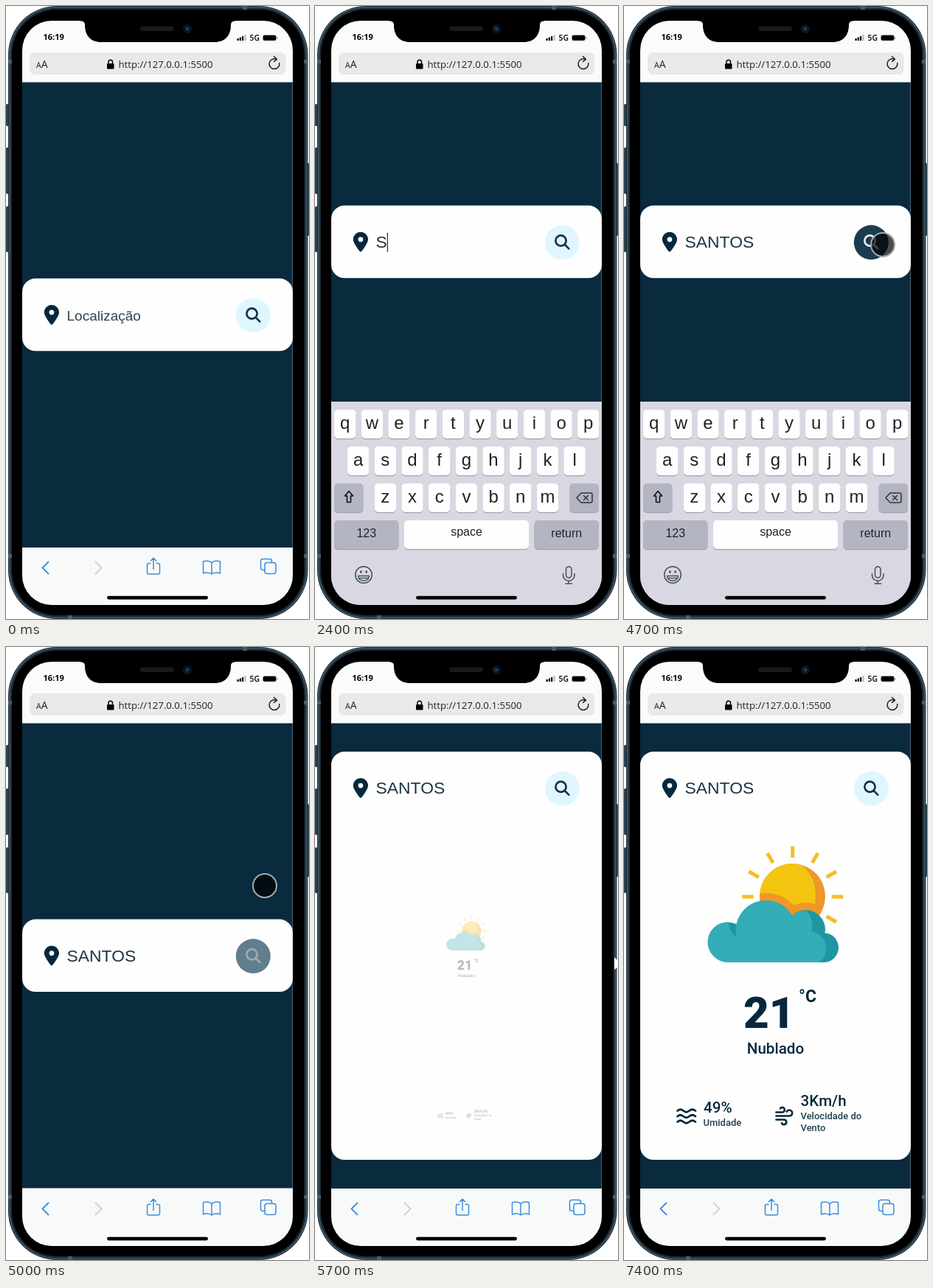
An HTML page that plays this animation: 411x832 px, repeating every 9.3 s.

```html
<!DOCTYPE html>
<html lang="pt-BR">
<head>
<meta charset="utf-8">
<title>Previsão do tempo</title>
<style>
html, body { margin: 0; width: 100%; height: 100%; overflow: hidden; background: #fff; }
svg { display: block; width: 100%; height: 100%; }
.ui { font-family: "Open Sans", "Noto Sans", sans-serif; }
.arial { font-family: "Liberation Sans", Arial, sans-serif; }
.roboto { font-family: Roboto, sans-serif; font-weight: 500; fill: #06283d; }
.line { fill: none; stroke-linecap: round; stroke-linejoin: round; }
.mid { text-anchor: middle; }
</style>
</head>
<body>
<svg viewBox="0 0 411 832" preserveAspectRatio="none">
  <defs>
    <clipPath id="screen"><rect x="22" y="20" width="367" height="793" rx="40"/></clipPath>
    <clipPath id="sun"><circle cx="228.500" cy="338.500" r="44.500"/></clipPath>
    <g id="cloudShape">
      <circle cx="140.500" cy="400.500" r="27"/>
      <circle cx="192.500" cy="385" r="41"/>
      <circle cx="246.500" cy="383.500" r="26.500"/>
      <circle cx="271" cy="408" r="20"/>
      <path d="M140 400H271V428H140z"/>
    </g>
  </defs>

  <!-- phone body -->
  <g fill="#2b4150">
    <rect x="0" y="133" width="5" height="30" rx="1.500"/>
    <rect x="0" y="192" width="5" height="63" rx="1.500"/>
    <rect x="0" y="272" width="5" height="62" rx="1.500"/>
    <rect x="406" y="213" width="5" height="99" rx="1.500"/>
  </g>
  <rect x="3" width="406.500" height="832" rx="66" fill="#1b2b36"/>
  <rect x="5" y="1.800" width="402.500" height="828.400" rx="64" fill="none" stroke="#435b6a" stroke-width="1.600"/>
  <rect x="8" y="5" width="396.500" height="822" rx="61"/>
  <g fill="#4b5c68">
    <rect x="321" y="0" width="6" height="5"/><rect x="84" y="827" width="6" height="5"/>
    <rect x="3" y="73" width="5" height="5"/><rect x="404" y="73" width="5" height="5"/>
    <rect x="3" y="744" width="5" height="5"/><rect x="404" y="744" width="5" height="5"/>
  </g>

  <g clip-path="url(#screen)">
    <rect x="22" y="20" width="367" height="793" fill="#0a2a3d"/>
    <path d="M388.500 104V735" stroke="#60727d" stroke-width=".8"/>

    <!-- browser header -->
    <rect x="22" y="20" width="367" height="83.500" fill="#fafbfb"/>
    <rect x="32" y="63" width="347.500" height="30" rx="7" fill="#e8e9e9"/>
    <g class="ui">
      <text x="50.500" y="46" font-size="11" font-weight="700">16:19</text>
      <text x="330.500" y="47" font-size="10.300" font-weight="600">5G</text>
      <text x="41" y="84" font-size="10.500" fill="#222">A<tspan font-size="14">A</tspan></text>
      <text x="152.500" y="84" font-size="13.200" fill="#222">http://127.0.0.1:5500</text>
    </g>
    <path d="M313.500 47v-3h2.200v3zM316.800 47v-4.500h2.200v4.500zM320 47v-6h2.200v6z"/>
    <path d="M323.400 47v-8h2.200v8z" fill="#bbb"/>
    <rect x="348.500" y="39.500" width="18" height="7.500" rx="2.300" stroke="#999" stroke-width=".8"/>
    <path d="M367.800 42v3" stroke="#999" stroke-width="1.200"/>
    <rect x="137" y="78" width="9.500" height="7.500" rx="1.200"/>
    <path class="line" d="M139 78v-2a2.750 2.750 0 0 1 5.500 0v2" stroke="#000" stroke-width="1.500"/>
    <path class="line" d="M370.800 77.500a6.900 6.900 0 1 1-4.500-5.400M363.500 68.500l4 3.900l-4 3" stroke="#222" stroke-width="1.500"/>

    <!-- weather card -->
    <rect id="card" x="22" width="367" rx="18" fill="#fefefe"/>
    <g id="row">
      <path transform="translate(51.800 35.800) scale(.0527)" fill="#06283d" fill-rule="evenodd"
        d="M215.700 499.200C267 435 384 279.400 384 192C384 86 298 0 192 0S0 86 0 192c0 87.400 117 243 168.300 307.200c12.300 15.300 35.100 15.300 47.400 0zM192 128a64 64 0 1 1 0 128a64 64 0 0 1 0-128z"/>
      <text id="field" class="arial" x="82.500"></text>
      <rect id="caret" y="37" width="1.200" height="26" fill="#16303f"/>
      <circle id="button" cx="335.300" cy="50" r="23.500"/>
      <path id="glass" class="line" d="M340.600 47.700a7.100 7.100 0 1 1-14.200 0a7.100 7.100 0 0 1 14.200 0M339 53.200l5.300 5.300" stroke-width="2.700"/>
    </g>
    <g id="weather">
      <g id="rays" stroke="#f5be25" stroke-width="5"></g>
      <circle cx="228.500" cy="338.500" r="44.500" fill="#ef9727"/>
      <g clip-path="url(#sun)">
        <path d="M234 293C252 301 260 318 260 339C260 356 253 372 240 384H184V293z" fill="#f4c510"/>
        <use href="#cloudShape" fill="#ef9727" stroke="#ef9727" stroke-width="20"/>
      </g>
      <use href="#cloudShape" fill="#2096a3"/>
      <g fill="#33adb8">
        <path d="M142 373.500C142 383 147 391 154 394L158 428H140.500A27 27 0 0 1 142 373.500z"/>
        <circle cx="192.500" cy="385" r="41"/>
        <path d="M228 365C235 359 243 357 247 358C255 365 257 375 254 386C266 389 274 397 274 408C274 417 271 424 265 428H140V400z"/>
      </g>
      <g class="roboto">
        <text x="162" y="517" font-size="60" font-weight="800">21</text>
        <text x="237" y="482" font-size="23" font-weight="600">°C</text>
        <text class="mid" x="205.500" y="552" font-size="20.600">Nublado</text>
      </g>
    </g>
    <g id="details" class="roboto">
      <g font-size="20.600"><text x="108" y="632">49%</text><text x="239.500" y="623">3Km/h</text></g>
      <g font-size="13" fill="#23404f">
        <text x="107.500" y="650">Umidade</text>
        <text x="239.500" y="641">Velocidade do</text><text x="239.500" y="657">Vento</text>
      </g>
      <g class="line" stroke="#06283d" stroke-width="2.700">
        <path id="waves"/>
        <path d="M206.500 631.500H215a3.300 3.300 0 1 0-3-5.300M206.500 636.500H224.500a4 4 0 1 0-3.700-6M206.500 641.500H217a3.300 3.300 0 1 1-3 4.800"/>
      </g>
    </g>

    <!-- bottom bar and keyboard -->
    <g id="nav">
      <rect id="navBack" x="22" width="367" height="280" fill="#f8faf9"/>
      <g class="line" stroke="#3d8cd8" stroke-width="1.500">
        <path d="M57.500 754.500l-8 8l8 8" stroke-width="1.800"/>
        <path d="M121.500 754.500l8 8l-8 8" stroke="#ccd0d4" stroke-width="1.800"/>
        <path d="M196 756.500h-2.500a2 2 0 0 0-2 2v10.500a2 2 0 0 0 2 2h13a2 2 0 0 0 2-2v-10.500a2 2 0 0 0-2-2H204M200 764.500V749.500M196.300 753l3.700-3.700l3.700 3.700"/>
        <path d="M279 756c-2-3-8-3.500-11.500-2v16c4-1.500 9-1 11.500 1c2.500-2 7.500-2.500 11.500-1v-16c-3.500-1.500-9.500-1-11.500 2v15"/>
        <rect x="351" y="755.500" width="15" height="15" rx="3"/>
        <path d="M351 765.500h-2.500a3 3 0 0 1-3-3v-9a3 3 0 0 1 3-3h9a3 3 0 0 1 3 3v2"/>
      </g>
    </g>
    <g id="keyboard">
      <rect x="22" width="367" height="280" fill="#d9d8e2"/>
      <g id="keys" class="arial mid" fill="#222226"></g>
      <path class="line" d="M46 121.500l5.500 6.500h-3v8.500h-5V128h-3z" stroke="#111" stroke-width="1.600"/>
      <g class="line" stroke="#333" stroke-width="1.500">
        <path d="M355 130.500l6-6.500h13a2 2 0 0 1 2 2v9a2 2 0 0 1-2 2h-13zM364.500 127.500l6 6m0-6l-6 6"/>
        <g stroke="#43505a">
          <circle cx="66" cy="235" r="11.300"/>
          <path d="M58.500 236.500h15c-.5 4.500-3.500 6.500-7.500 6.500s-7-2-7.500-6.500zM60.500 239.500h11"/>
          <path d="M62.300 230.500v1M69.700 230.500v1" stroke-width="2.600"/>
          <rect x="340.500" y="224" width="7.500" height="15" rx="3.750"/>
          <path d="M336.500 233.500v2a7.750 7.750 0 0 0 15.500 0v-2M344.250 243.500v3.500M340 247h8.500"/>
        </g>
      </g>
    </g>
    <rect x="137" y="800.800" width="137" height="4.600" rx="2.300"/>
  </g>

  <!-- notch -->
  <path d="M101 19H311V20.500C307 20.500 305 22 305 26C305 40 297 49 283 49H129C115 49 107 40 107 26C107 22 105 20.500 101 20.500z"/>
  <rect x="182" y="27.500" width="46" height="6.500" rx="3.250" fill="#17191b"/>
  <circle cx="246" cy="31" r="6" fill="#0b1621"/>
  <circle cx="246" cy="31" r="2.400" fill="#1b3d59"/>

  <circle id="touch" r="16" fill="#000" fill-opacity=".7" stroke="#a3abb0" stroke-width="2"/>
  <path id="pointer" d="M406 421L411 426V434L406 438z" fill="#fff"/>
</svg>

<script>
const LOOP = 9300, STEP = 100;
const PAGE_TOP = 103.2, NAV_TOP = 735, KEYS_TOP = 537, ROW_HEIGHT = 98.5, FULL_HEIGHT = 554;
const el = Object.fromEntries([...document.querySelectorAll('[id]')].map(e => [e.id, e]));
const mix = (a, b, k) => a + (b - a) * k;
const clamp = k => Math.min(1, Math.max(0, k));
const within = (t, ranges) => ranges.some(([a, b]) => t >= a && t < b);
const set = (node, attrs) => { for (const k in attrs) node.setAttribute(k, attrs[k]); };
const show = (node, on) => set(node, { visibility: on ? 'visible' : 'hidden' });
const blend = (a, b, k) => `rgb(${a.map((v, i) => Math.round(mix(v, b[i], k)))})`;

function bezier(x1, y1, x2, y2) {
  const at = (a, b, s) => 3 * a * s * (1 - s) ** 2 + 3 * b * s * s * (1 - s) + s ** 3;
  return x => {
    let lo = 0, hi = 1;
    for (let i = 0; i < 24; i++) {
      const s = (lo + hi) / 2;
      if (at(x1, x2, s) < x) lo = s; else hi = s;
    }
    return at(y1, y2, (lo + hi) / 2);
  };
}
const ease = bezier(.25, .1, .25, 1), easeOut = bezier(0, 0, .58, 1);
const run = (t, start, length, curve = ease) => {
  const k = clamp((t - start) / length);
  return k === 0 || k === 1 ? k : curve(k);
};

// Static parts built by rule
function key(x, y, w, label, size, rise, grey) {
  const fill = grey ? '#b4b5c3' : '#fefefe';
  return `<rect x="${x}" y="${y + 1.2}" width="${w}" height="39" rx="5" fill="#a2a2ae"/>
    <rect x="${x}" y="${y}" width="${w}" height="39" rx="5" fill="${fill}"/>
    <text x="${x + w / 2}" y="${y + rise}" font-size="${size}">${label}</text>`;
}
const letters = (text, x, y) =>
  [...text].map((c, i) => key(x + i * 36.68, y, 29.3, c, 24, 25.5)).join('');
el.keys.innerHTML = letters('qwertyuiop', 26, 11) + letters('asdfghjkl', 44, 61) + letters('zxcvbnm', 80.7, 111) +
  key(26, 111, 39.5, '', 16, 0, true) + key(345.5, 111, 39.5, '', 16, 0, true) +
  key(26, 161, 87.5, '123', 16, 23, true) + key(121, 161, 169, 'space', 16, 21) +
  key(297.5, 161, 87.5, 'return', 16, 23, true);
el.rays.innerHTML = [...Array(8)].map((_, i) =>
  `<path d="M53 0H68.500" transform="translate(228.700 339) rotate(${i * 30 - 180})"/>`).join('');
set(el.waves, { d: [628.5, 636, 643.5].map(y => `M72.500 ${y + 1}q4-3.500 8 0t8 0t8.500 0`).join('') });

const typedAt = [2400, 2600, 2700, 2800, 2900, 3100];
const caretOn = [[900, 1400], [2000, 3600], [4100, 4600]];
const touchOn = [[600, 2400], [4100, 5300]];
const touchPath = [[600, 330, 430], [700, 225, 419], [800, 157, 414], [4100, 157, 414],
  [4300, 262, 366], [4500, 351, 324], [5000, 351, 324], [5300, 408, 430]];

function touchPoint(t) {
  const i = Math.max(1, touchPath.findIndex(p => p[0] > t));
  const [a, b] = [touchPath[i - 1], touchPath[i]], k = clamp((t - a[0]) / (b[0] - a[0]));
  return { cx: mix(a[1], b[1], k), cy: mix(a[2], b[2], k) };
}

function render(t) {
  const open = run(t, 815, 300) - run(t, 4720, 300);
  const bottom = mix(NAV_TOP, KEYS_TOP, open);
  const height = mix(ROW_HEIGHT, FULL_HEIGHT, run(t, 5100, 600, easeOut));
  const top = (PAGE_TOP + bottom - height) / 2;

  set(el.card, { y: top, height });
  set(el.row, { transform: `translate(0 ${top})` });
  set(el.navBack, { y: bottom });
  set(el.keyboard, { transform: `translate(0 ${bottom})` });
  show(el.keyboard, open > .02);

  const typed = 'SANTOS'.slice(0, typedAt.filter(at => at <= t).length);
  el.field.textContent = typed || 'Localização';
  set(el.field, { y: 57, 'font-size': typed ? 22.9 : 19, fill: typed ? '#1c3545' : '#2f4553' });
  set(el.caret, { x: 82.5 + (typed ? el.field.getComputedTextLength() : 0) });
  show(el.caret, within(t, caretOn));

  const hover = run(t, 4450, 400) - run(t, 4898, 400);
  set(el.button, { fill: blend([223, 246, 255], [6, 40, 61], hover) });
  set(el.glass, { stroke: blend([22, 50, 69], [255, 255, 255], hover) });

  const reveal = run(t, 5600, 500);
  for (const [node, cy] of [[el.weather, 405], [el.details, 636]]) {
    set(node, {
      opacity: reveal,
      transform: `translate(205.500 ${cy + top - 142.1}) scale(${reveal}) translate(-205.500 ${-cy})`
    });
    show(node, reveal > 0);
  }

  show(el.touch, within(t, touchOn));
  if (within(t, touchOn)) set(el.touch, touchPoint(t));
  show(el.pointer, within(t, [[5300, 7400]]));
}

const start = performance.now();
function frame() {
  const t = (performance.now() - start) % LOOP;
  render(Math.floor(t / STEP) * STEP);
  requestAnimationFrame(frame);
}
frame();
</script>
</body>
</html>
```
